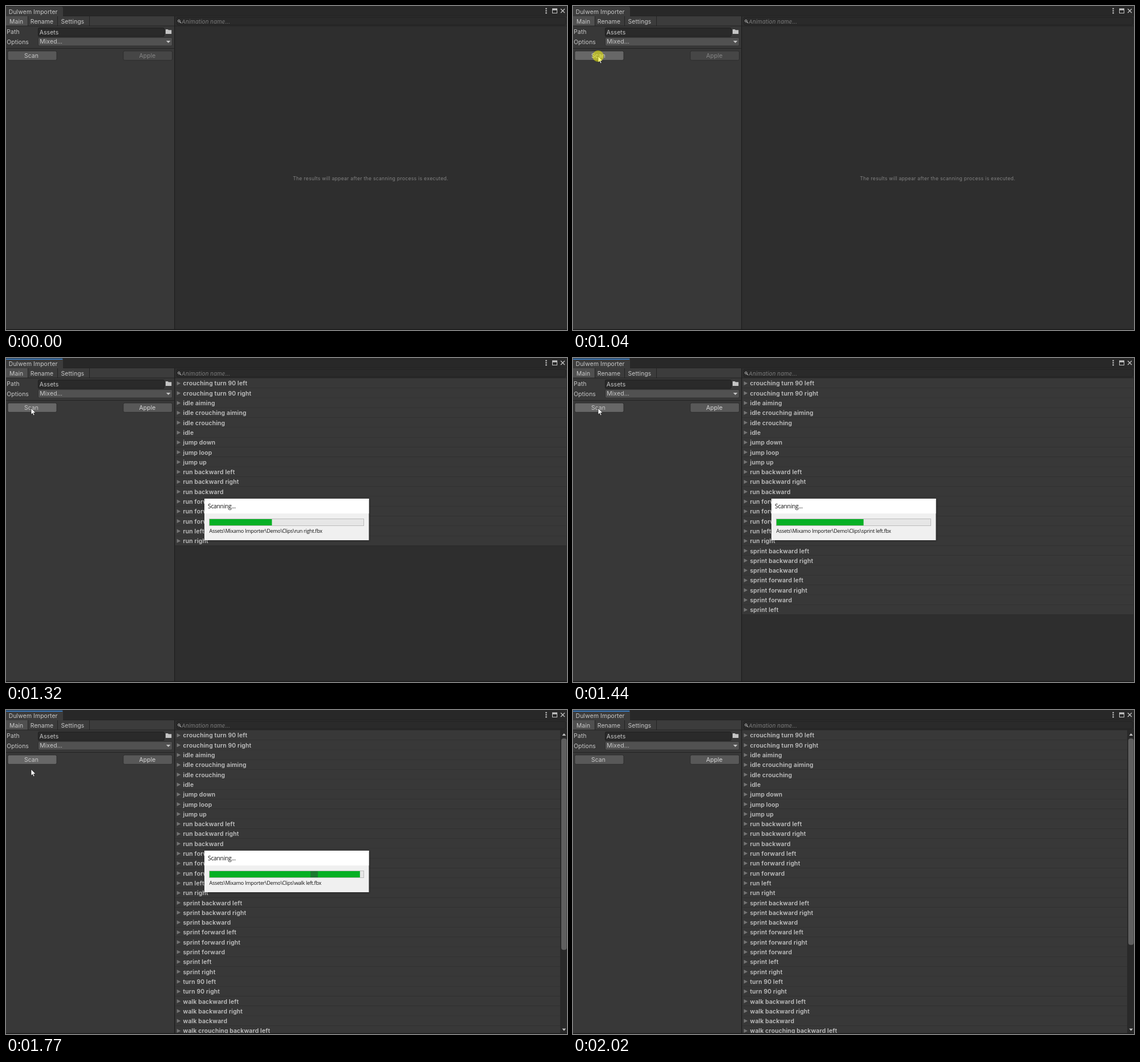
An HTML page that plays this animation: 984x569 px, repeating every 2.55 s.

```html
<!DOCTYPE html>
<html lang="en">
<head>
<meta charset="utf-8">
<title>Importer window</title>
<style>
  html, body { margin: 0; width: 100%; height: 100%; overflow: hidden; background: #2e2e2e; }
  svg { display: block; width: 984px; height: 569px; }
  text { font: 10.4px Inter, "Noto Sans", sans-serif; font-kerning: none; letter-spacing: .08px; fill: #c8c8c8; white-space: pre; }
  .bold { font-weight: 600; letter-spacing: .16px; fill: #c2c2c2; }
  .hint { font-size: 9.5px; font-style: italic; letter-spacing: .2px; fill: #7c7c7c; }
  .note { font-size: 8.65px; letter-spacing: .27px; fill: #828282; }
  .mid { text-anchor: middle; }
  .caption { font: 10.4px "Open Sans", "Noto Sans", sans-serif; letter-spacing: -.3px; fill: #111; }
  .file { font: 9px "Open Sans", "Noto Sans", sans-serif; letter-spacing: -.28px; fill: #111; }
  .line { fill: #232323; }
  .icon { fill: #c4c4c4; }
  .stroke { fill: none; stroke: #c4c4c4; }
  .box { fill: #2a2a2a; stroke: #1e1e1e; }
  .btn { fill: #585858; stroke: #2c2c2c; }
  .panel { filter: drop-shadow(1px 1px 1.5px rgba(0, 0, 0, .3)); }
</style>
</head>
<body>
<svg viewBox="0 0 984 569">
  <!-- window and title bar -->
  <rect width="984" height="569" fill="#2e2e2e"/>
  <rect width="984" height="18" fill="#282828"/>
  <path d="M0 18V1H97Q100 1 100 4V18Z" fill="#3c3c3c"/>
  <rect id="focus" x="0" y="1" width="99.500" height="2" rx="1" fill="#3a79bb"/>
  <text x="4.800" y="13.800">Dulwem Importer</text>
  <g class="icon">
    <circle cx="947.500" cy="4.700" r="1.300"/>
    <circle cx="947.500" cy="8.500" r="1.300"/>
    <circle cx="947.500" cy="12.300" r="1.300"/>
    <rect x="958" y="4.500" width="9" height="3"/>
  </g>
  <rect class="stroke" x="958.500" y="5" width="8" height="7.500"/>
  <path class="stroke" stroke-width="1.300" d="M973 5l7 7M980 5l-7 7"/>

  <!-- left panel -->
  <rect y="17.500" width="295" height="551.500" fill="#383838"/>
  <rect y="17.500" width="295" height="17.500" fill="#3c3c3c"/>
  <rect y="18" width="38" height="17" fill="#505050"/>
  <g class="line">
    <rect x="100" y="17" width="884" height="1"/>
    <rect x="38" y="18" width="1" height="17"/>
    <rect x="90" y="18" width="1" height="17"/>
    <rect x="146" y="18" width="1" height="17"/>
    <rect y="34.500" width="984" height="1"/>
    <rect y="74" width="295" height="1"/>
  </g>
  <text x="6" y="30.800">Main</text>
  <text x="42.700" y="30.800">Rename</text>
  <text x="96.500" y="30.800">Settings</text>

  <text x="1.300" y="49.200">Path</text>
  <rect class="box" x="56.500" y="38.500" width="221" height="15" rx="2"/>
  <text x="58.800" y="49.800">Assets</text>
  <path class="icon" d="M280 41h4l1 1.300h5.300V49H280Z"/>
  <text x="1.300" y="66.800">Options</text>
  <rect x="56.500" y="55.500" width="235" height="14.500" rx="2" fill="#515151" stroke="#303030"/>
  <text x="59.300" y="66">Mixed...</text>
  <path class="icon" d="M281 61h7.500l-3.750 4Z"/>

  <rect id="scan" class="btn" x="3" y="79" width="86" height="16.300" rx="2.500"/>
  <text class="mid" x="44.500" y="90.700">Scan</text>
  <rect id="apply" class="btn" x="205.700" y="79" width="86" height="16.300" rx="2.500"/>
  <text id="applyText" class="mid" x="248" y="90.700">Apple</text>

  <!-- result list -->
  <rect x="299.500" y="19.800" width="682.500" height="13.500" rx="2.500" fill="#2a2a2a" stroke="#212121"/>
  <circle class="stroke" cx="303.400" cy="26.200" r="1.800"/>
  <path class="stroke" stroke-width="1.200" d="M304.800 27.600l2.200 2.200"/>
  <text class="hint" x="308.300" y="30.600">Animation name...</text>
  <text id="empty" class="note mid" x="639.500" y="306.200">The results will appear after the scanning process is executed.</text>
  <g id="rows"></g>
  <g id="scroll">
    <rect x="972" y="35.500" width="12" height="533" fill="#292929"/>
    <path class="icon" d="M975.500 45l3.300-4 3.300 4ZM975.500 559.500l3.300 4 3.300-4Z"/>
    <rect id="thumb" x="974" y="50" width="9.500" rx="4" fill="#5f5f5f"/>
  </g>
  <rect x="295" y="18" width="1.300" height="551" fill="#202020"/>
  <rect y="567.500" width="984" height="1.500" fill="#1b1b1b"/>

  <!-- progress dialog -->
  <g id="dialog">
    <rect class="panel" x="348" y="247" width="288.500" height="73" fill="#f0f0f0"/>
    <rect x="348" y="247" width="288.500" height="26" fill="#fff"/>
    <text class="caption" x="354" y="263.800">Scanning...</text>
    <rect x="356.500" y="282.500" width="271" height="12" fill="#e6e6e6" stroke="#bcbcbc"/>
    <rect id="bar" x="357" y="283" height="11" fill="#06b025"/>
    <rect id="glint" x="534" y="283" width="13" height="11" fill="#1a7a30"/>
    <text id="file" class="file" x="356.500" y="307"></text>
  </g>

  <g id="cursor">
    <path d="M0 0V11.300L2.600 9 4.300 12.900 6.200 12.100 4.500 8.300H8Z" fill="#fff" stroke="#111" stroke-width=".7"/>
    <circle id="click" r="10" fill="#ff0" opacity=".5"/>
  </g>
</svg>
<script>
const LOOP = 2550, SHOW = 750, START = 1260, DONE = 1790, GONE = 2020;
const PRESS = 1000, RELEASE = 1130, TICK = 20;
const ROW = 17.3, TOP = 35.9, VIEW = 533, TRACK = 506;

// [time, row count]
const COUNT = [[1260, 13], [1320, 17], [1560, 32], [1770, 42], [1790, 43]];
// [time, x, y] of the pointer tip
const PATH = [
  [750, 8, 147], [830, 18, 128], [910, 32, 104], [980, 41, 91], [1020, 44, 88],
  [1700, 44, 88], [1740, 44, 94], [1770, 44, 104], [1790, 45, 118],
  [1850, 62, 190], [1910, 120, 320], [1960, 200, 440], [2010, 275, 516]
];

const sides = name => [name + " left", name + " right", name];
const gait = name => [...sides(name + " backward"), ...sides(name + " forward"), name + " left", name + " right"];
const names = [
  "crouching turn 90 left", "crouching turn 90 right",
  "idle aiming", "idle crouching aiming", "idle crouching", "idle",
  "jump down", "jump loop", "jump up",
  ...gait("run"), ...gait("sprint"), "turn 90 left", "turn 90 right",
  ...sides("walk backward"), ...gait("walk crouching"),
  ...sides("walk forward"), "walk left", "walk right"
];

const $ = id => document.getElementById(id);
const show = (id, on) => { $(id).style.display = on ? "" : "none"; };

$("rows").innerHTML = names.map((name, i) => `
  <g transform="translate(0 ${(TOP + i * ROW).toFixed(2)})">
    <rect class="back" x="296.500" y="-.4" height="${ROW}" fill="#383838"/>
    <rect class="back" x="296.500" y="16.600" height="1" fill="#2a2a2a"/>
    <path d="M299.700 5l6.600 3.500-6.600 3.500Z" fill="#747474"/>
    <text class="bold" x="310.500" y="12.500">${name}</text>
  </g>`).join("");
const rows = [...$("rows").children];
const backs = document.querySelectorAll(".back");

function at(keys, t) {
  const last = keys[keys.length - 1];
  if (t <= keys[0][0]) return keys[0].slice(1);
  if (t >= last[0]) return last.slice(1);
  const i = keys.findIndex(k => k[0] > t);
  const a = keys[i - 1], b = keys[i];
  const p = (t - a[0]) / (b[0] - a[0]);
  return a.slice(1).map((v, j) => v + (b[j + 1] - v) * p);
}

function filePath(name) {
  const full = `Assets\\Mixamo Importer\\Demo\\Clips\\${name}.fbx`;
  return full.length > 63 ? full.replace("\\Clips", "...") : full;
}

function drawList(t) {
  const scanned = t >= START;
  const count = scanned ? Math.floor(at(COUNT, t)[0] + 1e-6) : 0;
  const height = count * ROW;
  const long = height > VIEW;
  rows.forEach((row, i) => { row.style.display = i < count ? "" : "none"; });
  backs.forEach(b => b.setAttribute("width", long ? 675.5 : 686.5));
  show("empty", !scanned);
  show("focus", scanned);
  show("scroll", long);
  if (long) $("thumb").setAttribute("height", TRACK * VIEW / height);
  $("apply").style.fill = scanned ? "#585858" : "#464646";
  $("applyText").style.fill = scanned ? "#d6d6d6" : "#858585";

  const busy = scanned && t < DONE;
  show("dialog", busy);
  if (busy) {
    const fill = 4.4 + 265.6 * count / names.length;
    $("bar").setAttribute("width", fill);
    show("glint", fill >= 190);
    $("file").textContent = filePath(names[count - 1]);
  }
}

function drawCursor(t) {
  const [x, y] = at(PATH, Math.floor((t - 10) / TICK) * TICK + 10);
  show("cursor", t >= SHOW && t < GONE);
  show("click", t >= PRESS && t < RELEASE);
  $("cursor").setAttribute("transform", `translate(${x} ${y})`);
  const hover = t > SHOW && t < DONE && (y < 95 || t > START);
  $("scan").style.fill = hover ? "#676767" : "#585858";
}

let begin;
function frame(now) {
  begin ??= now;
  const t = (now - begin) % LOOP;
  drawList(t);
  drawCursor(t);
  requestAnimationFrame(frame);
}
requestAnimationFrame(frame);
</script>
</body>
</html>
```
